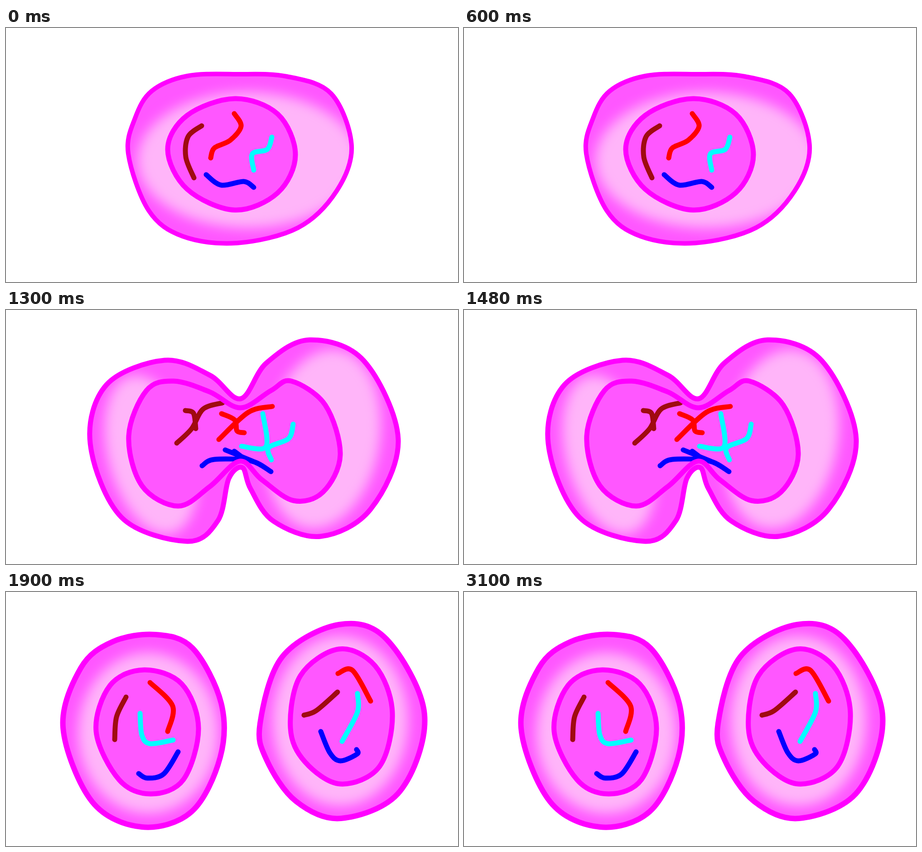
Recreate the animation shown at these times as an HTML page. Size 998x561 px, loop 3.9 s.

```html
<!DOCTYPE html>
<html lang="en">
<head>
<meta charset="utf-8">
<title>Cell division</title>
<style>
html, body { margin: 0; width: 100%; height: 100%; overflow: hidden; background: #fff; }
svg { display: block; width: 100%; height: 100%; }
path { stroke-linecap: round; stroke-linejoin: round; }
</style>
</head>
<body>
<svg id="stage" viewBox="0 0 998 561">
  <defs>
    <filter id="soft" filterUnits="userSpaceOnUse" x="0" y="0" width="998" height="561" color-interpolation-filters="sRGB">
      <feGaussianBlur stdDeviation="14"/>
    </filter>
  </defs>
</svg>
<script>
const LOOP = 3900;
const LINE = '#ff00ff', DEEP = '#ff57ff', PALE = '#ffb5f9';
const INK = { brown: '#a00a10', red: '#ff0000', cyan: '#00ffff', blue: '#0000ff' };

// Key points of each pose. glow: soft ellipses as [cx, cy, rx, ry, tilt].
const stages = [
  {
    start: 0, width: 10,
    cell: ['270,278 285,199 322,139 400,106 510,102 620,107 718,145 763,260 730,360 645,441 510,475 390,460 315,403'],
    core: ['357,268 400,193 505,156 600,190 639,280 600,364 505,402 400,356'],
    glow: [[535, 292, 245, 150, 0]],
    brown: ['432,216 402,240 397,285 415,331'],
    red: ['504,189 519,217 495,248 460,265 452,287'],
    cyan: ['587,241 577,268 544,278 547,314'],
    blue: ['442,324 475,347 525,339 547,352']
  },
  {
    start: 1000, width: 11,
    cell: ['226,278 254,154 347,90 432,112 510,142 580,112 655,90 770,145 830,295 760,446 630,493 560,463 508,422 450,458 382,481 275,425'],
    core: ['314,265 345,185 400,164 510,194 615,185 714,310 690,390 615,424 510,390 420,413 337,370'],
    glow: [[410, 280, 162, 155, 0], [660, 310, 172, 158, 0]],
    brown: ['399,215 396,265 387,304 362,323', '428,227 406,255 399,300 416,322'],
    red: ['474,221 491,236 478,294', '543,220 500,244 438,278'],
    cyan: ['577,236 560,275 523,307', '612,246 555,283 567,317'],
    blue: ['458,327 510,349 535,375', '437,352 495,344 548,352']
  },
  {
    start: 1300, width: 11,
    cell: ['186,295 222,165 350,111 450,144 518,196 575,117 670,66 790,112 866,285 805,440 695,500 590,466 540,395 522,348 492,372 468,465 400,511 255,458'],
    core: ['271,278 310,178 370,157 450,181 518,216 585,178 630,157 705,210 738,320 700,402 635,421 565,375 516,334 450,390 380,433 300,388'],
    glow: [[320, 320, 95, 180, -15], [700, 285, 125, 200, 10]],
    brown: ['396,222 414,228 419,262', '478,205 435,219 410,262 377,294'],
    red: ['476,229 505,243 510,267 526,271', '588,213 535,226 470,286'],
    cyan: ['567,229 574,302 520,301', '634,252 624,284 580,304 586,331'],
    blue: ['433,344 460,330 540,333 585,357', '484,309 545,334', '504,312 520,324']
  },
  {
    start: 1600, width: 11,
    cell: ['160,315 175,225 225,135 330,106 425,150 500,220 530,252 538,252 553,210 620,105 720,60 815,110 897,290 835,437 705,487 590,444 541,358 522,292 495,318 450,460 357,515 240,453'],
    core: ['271,270 292,210 355,184 440,212 520,267 620,203 695,176 765,222 784,305 735,410 675,431 592,395 541,298 520,292 484,322 435,400 380,430 300,398'],
    glow: [[330, 318, 130, 168, -12], [490, 310, 45, 90, 0], [690, 270, 165, 190, 0]],
    brown: ['312,230 341,285 318,320 315,335', '545,279 580,284 645,284'],
    red: ['383,223 448,243 452,270 405,300', '680,206 603,245 620,264'],
    cyan: ['505,276 455,293 413,322', '659,290 598,312 614,367'],
    blue: ['328,370 360,389 411,361', '580,353 630,402 670,385']
  },
  {
    start: 1900, width: 12,
    cell: [
      '126,300 165,168 235,110 330,94 412,124 475,245 473,365 410,485 300,519 190,463',
      '561,290 610,143 735,72 840,104 924,270 870,440 740,500 640,462 575,370'
    ],
    core: [
      '199,308 230,206 305,172 388,203 425,300 392,414 320,446 250,415',
      '628,300 650,185 735,126 815,163 853,265 825,385 738,424 660,375'
    ],
    glow: [[314, 312, 155, 178, 0], [738, 285, 150, 188, 0]],
    brown: ['265,232 244,276 240,326', '732,221 685,262 658,272'],
    red: ['318,200 368,252 357,308', '733,180 765,173 805,241'],
    cyan: ['296,268 300,316 318,335 369,327', '776,224 776,265 742,330'],
    blue: ['380,353 348,402 312,411 293,401', '695,308 715,355 738,373 775,358 774,348']
  }
];

const svg = document.getElementById('stage');

function add(parent, tag, attrs) {
  const el = document.createElementNS('http://www.w3.org/2000/svg', tag);
  for (const key in attrs) el.setAttribute(key, attrs[key]);
  return parent.appendChild(el);
}

// Catmull-Rom spline through the key points.
function spline(points, closed) {
  const p = points.split(' ').map(k => k.split(',').map(Number));
  const n = p.length;
  const at = i => closed ? p[(i + n) % n] : p[Math.max(0, Math.min(n - 1, i))];
  let d = 'M' + p[0];
  for (let i = 0; i < (closed ? n : n - 1); i++) {
    const [a, b, c, e] = [at(i - 1), at(i), at(i + 1), at(i + 2)];
    const c1 = b.map((v, k) => v + (c[k] - a[k]) / 6);
    const c2 = c.map((v, k) => v - (e[k] - b[k]) / 6);
    d += `C${c1} ${c2} ${c}`;
  }
  return closed ? d + 'Z' : d;
}

const shape = (lists, closed) => lists.map(k => spline(k, closed)).join('');

function build(s, i) {
  const g = add(svg, 'g', { display: 'none' });
  const cell = shape(s.cell, true), core = shape(s.core, true);
  const stroke = (d, color, width) =>
    add(g, 'path', { d, fill: 'none', stroke: color, 'stroke-width': width });

  add(add(g, 'clipPath', { id: 'cell' + i }), 'path', { d: cell });
  add(g, 'path', { d: cell, fill: DEEP });
  const inside = add(g, 'g', { 'clip-path': `url(#cell${i})` });
  const glow = add(inside, 'g', { fill: PALE, filter: 'url(#soft)' });
  for (const [cx, cy, rx, ry, tilt] of s.glow)
    add(glow, 'ellipse', { cx, cy, rx, ry, transform: `rotate(${tilt} ${cx} ${cy})` });
  stroke(cell, LINE, s.width);
  add(g, 'path', { d: core, fill: DEEP });
  for (const name in INK) stroke(shape(s[name]), INK[name], 11);
  stroke(core, LINE, 11);
  return g;
}

const groups = stages.map(build);

function draw(ms) {
  const t = ms % LOOP;
  const now = stages.filter(s => s.start <= t).length - 1;
  groups.forEach((g, i) => g.setAttribute('display', i === now ? 'inline' : 'none'));
}

const begin = performance.now();
function tick() {
  draw(performance.now() - begin);
  requestAnimationFrame(tick);
}
tick();
</script>
</body>
</html>
```
